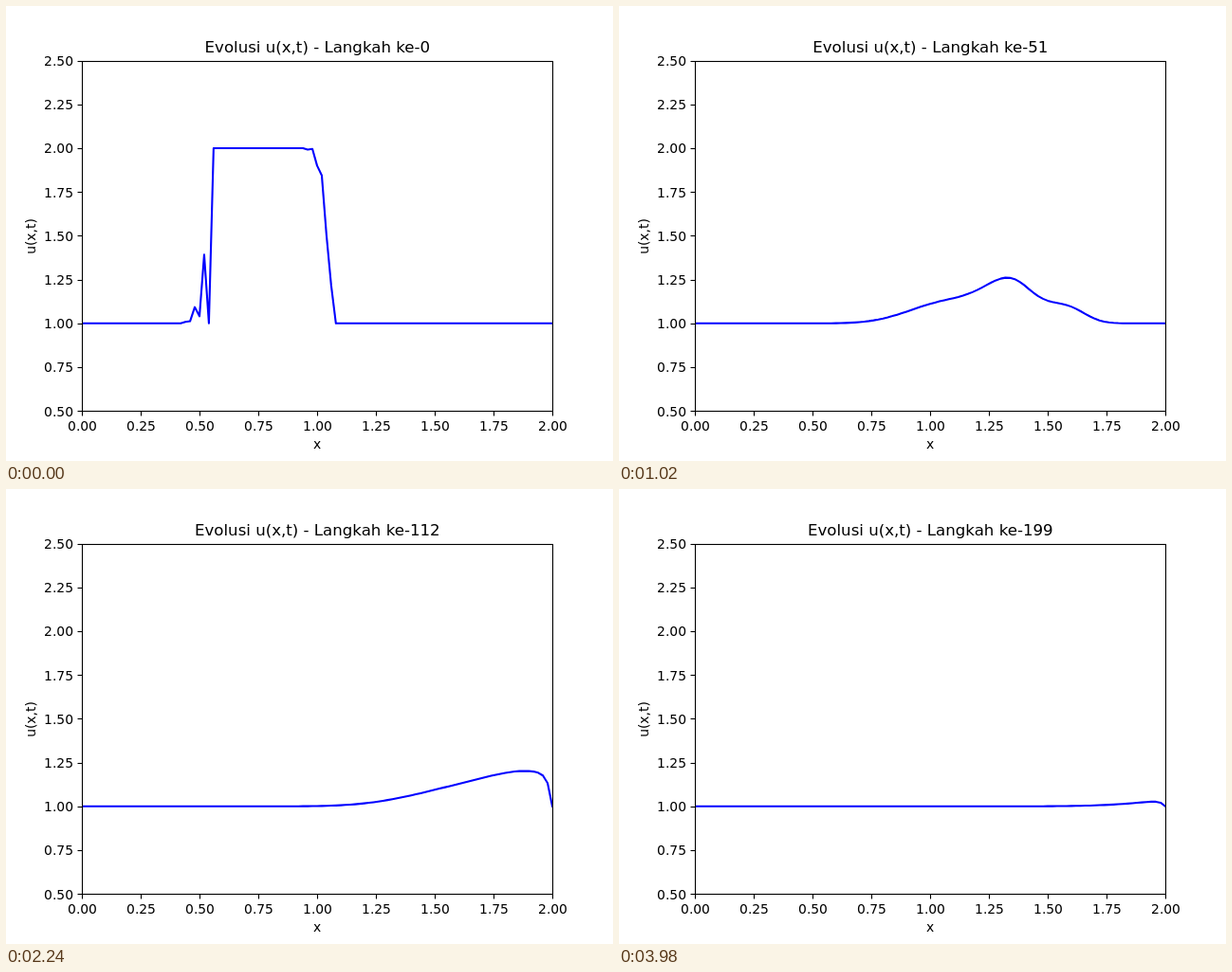
Recreate the animation shown at these times as an HTML page with a canvas. Size 640 by 480 pixels, loop 4000 ms.

```html
<!DOCTYPE html>
<html lang="id">
<head>
<meta charset="utf-8">
<title>Evolusi u(x,t)</title>
<style>
html, body { margin: 0; height: 100%; overflow: hidden; background: #fff; }
canvas { display: block; }
</style>
</head>
<body>
<canvas id="plot" width="640" height="480"></canvas>
<script>
const ctx = document.getElementById('plot').getContext('2d');
const FRAMES = 200, FRAME_MS = 20;
const LEFT = 80, RIGHT = 576, TOP = 57.6, BOTTOM = 427.2;
const toX = x => LEFT + x * 248;
const toY = u => BOTTOM - (u - 0.5) * 184.8;

// Burgers equation: upwind convection plus central diffusion
const NX = 101, DX = 0.02, DT = 0.008, NU = 0.01;
const C = DT / DX, D = NU * DT / DX ** 2;

function advance(u) {
  return u.map((v, i) => i === 0 || i === NX - 1 ? 1
    : v - C * v * (v - u[i - 1]) + D * (u[i + 1] - 2 * v + u[i - 1]));
}

// The first picture already shows the third time step
let state = Array.from({ length: NX }, (_, i) => i >= 25 && i <= 50 ? 2 : 1);
state = advance(advance(state));
const states = Array.from({ length: FRAMES }, () => state = advance(state));

function text(str, x, y, size = 13.88, align = 'center') {
  ctx.font = `${size}px "DejaVu Sans", sans-serif`;
  ctx.textAlign = align;
  ctx.fillText(str, x, y);
}

function segment(x1, y1, x2, y2) {
  ctx.beginPath();
  ctx.moveTo(x1, y1);
  ctx.lineTo(x2, y2);
  ctx.stroke();
}

function drawCurve(u) {
  ctx.save();
  ctx.beginPath();
  ctx.rect(LEFT, 58, RIGHT - LEFT, 369);
  ctx.clip();
  ctx.strokeStyle = '#00f';
  ctx.lineWidth = 1.5 * 100 / 72;
  ctx.lineJoin = 'round';
  ctx.lineCap = 'square';
  ctx.beginPath();
  u.forEach((v, i) => ctx.lineTo(toX(i * DX), toY(v)));
  ctx.stroke();
  ctx.restore();
}

function drawAxes() {
  ctx.strokeStyle = ctx.fillStyle = '#000';
  ctx.lineWidth = 0.8 * 100 / 72;
  ctx.strokeRect(80.5, 58.5, 496, 369);
  for (let k = 0; k <= 8; k++) {
    const x = toX(k / 4), u = 0.5 + k / 4, y = toY(u), row = Math.round(y) + 0.5;
    segment(x + 0.5, 427.5, x + 0.5, 432.5);
    segment(75.5, row, 80.5, row);
    text((k / 4).toFixed(2), x + 0.5, 448);
    text(u.toFixed(2), 71, Math.round(y + 5.4), 13.88, 'right');
  }
  text('x', 328, 467);
  ctx.save();
  ctx.translate(31, 243);
  ctx.rotate(-Math.PI / 2);
  text('u(x,t)', 0, 0);
  ctx.restore();
}

function draw() {
  const n = Math.floor(performance.now() % (FRAMES * FRAME_MS) / FRAME_MS);
  ctx.fillStyle = '#fff';
  ctx.fillRect(0, 0, 640, 480);
  drawCurve(states[n]);
  drawAxes();
  text(`Evolusi u(x,t) - Langkah ke-${n}`, 328.3, 49, 16.63);
  requestAnimationFrame(draw);
}
draw();
</script>
</body>
</html>
```
